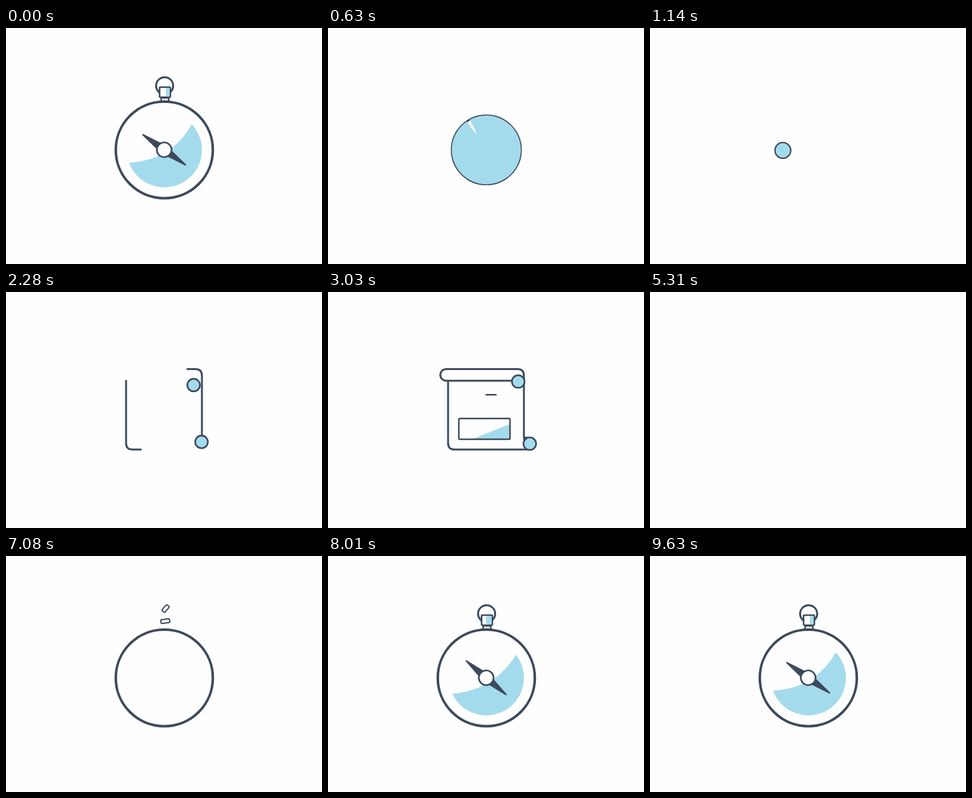
An HTML page for the animation above (9690 ms loop, 500 by 375 pixels).

```html
<!DOCTYPE html>
<html lang="en">
<head>
<meta charset="utf-8">
<title>Compass and scroll</title>
<style>
  html, body { margin: 0; width: 100%; height: 100%; overflow: hidden; background: #fefefe; }
  svg { display: block; width: 100%; height: 100%; }
  .ink { stroke: #3c4a5b; fill: none; stroke-width: 3; stroke-linecap: round; stroke-linejoin: round; }
  .blue { fill: #a4dbec; }
  .white { fill: #fefefe; }
</style>
</head>
<body>
<svg viewBox="0 0 500 375">
  <g id="compass">
    <g id="knob">
      <rect id="loop" class="ink white"/>
      <rect id="stem" class="ink white" x="245.5" width="12" style="stroke-width:2.5"/>
      <rect id="cap" class="ink white"/>
      <rect id="shine" class="blue" y="95.5" height="13"/>
    </g>
    <circle id="ring" class="ink" cx="250.5" cy="193.7"/>
    <path id="arcs" class="ink" style="stroke-width:4"/>
    <path id="dial" class="blue"/>
    <g id="needle">
      <path d="M-42 -1 Q-43 0 -42 1 L-13 5.5 L0 6 L13 5.5 L42 1 Q43 0 42 -1 L13 -5.5 L0 -6 L-13 -5.5Z" fill="#3c4a5b"/>
      <circle class="ink white" r="11.7" style="stroke-width:2.6"/>
    </g>
  </g>
  <g id="scroll">
    <path id="sheet" class="ink" pathLength="1" d="M310 232 V133 Q310 122.5 300 122.5 H187 A9.2 9.2 0 0 0 187 141 H291 M190 141 V240 Q190 250.3 200 250.3 H319"/>
    <path id="fold" d="M309 230 H320 L312 238 L309 238Z" fill="#3c4a5b"/>
    <path id="wedge" class="blue" d="M228 234 L287.5 210 V234Z"/>
    <path id="frame" class="ink" pathLength="1" style="stroke-width:2.4" d="M288 203 V232 Q288 234 286 234 H209 Q207 234 207 232 V203 Q207 201 209 201 H286 Q288 201 288 203"/>
    <path id="line1" class="ink" style="stroke-width:2.5"/>
    <path id="line2" class="ink" style="stroke-width:2.5"/>
    <circle id="ballA" class="ink blue"/>
    <circle id="ballB" class="ink blue"/>
  </g>
</svg>
<script>
const LOOP = 9690, CX = 250.5, CY = 193.7;
const el = {};
document.querySelectorAll('[id]').forEach(e => el[e.id] = e);

const set = (id, attrs) => {
  for (const name in attrs) el[id].setAttribute(name, attrs[name]);
};
const show = (id, on) => { el[id].style.display = on ? '' : 'none'; };
const unit = (t, from, to) => Math.min(1, Math.max(0, (t - from) / (to - from)));
const smooth = u => u * u * (3 - 2 * u);
const out = u => 1 - (1 - u) ** 3;

// Eased value through time, value pairs.
function keys(t, ...k) {
  let i = 0;
  while (i < k.length - 4 && t > k[i + 2]) i += 2;
  return k[i + 1] + (k[i + 3] - k[i + 1]) * smooth(unit(t, k[i], k[i + 2]));
}

function polar(r, deg) {
  const a = deg * Math.PI / 180;
  return [CX + r * Math.cos(a), CY + r * Math.sin(a)];
}

function dialPath(r, half) {
  if (half < 0.1 || r < 0.1) return '';
  const mid = 58.5, c = Math.cos(half * Math.PI / 180);
  const bend = r * (c + 0.45 * (1 - c));
  return `M${polar(r, mid - half)} A${r} ${r} 0 ${+(half > 90)} 1 ${polar(r, mid + half)}`
    + ` Q${polar(bend, mid)} ${polar(r, mid - half)}Z`;
}

function box(id, x, y, w, h, rx, turn, stroke) {
  set(id, { x: x - w / 2, y: y - h / 2, width: w, height: h, rx, transform: `rotate(${turn} ${x} ${y})` });
  el[id].style.strokeWidth = stroke;
}

function trace(id, p) {
  show(id, p > 0);
  set(id, { 'stroke-dasharray': p < 1 ? `${p} 2` : 'none' });
}

function drawRing(t) {
  const leaving = t < 1000;
  const r = leaving ? keys(t, 0, 76.8, 330, 91.5, 960, 12.5) : 76.8;
  show('ring', leaving || t >= 6800);
  set('ring', { r });
  el.ring.style.strokeWidth = leaving ? keys(t, 330, 4, 960, 2) : 4;

  const closing = t >= 5340 && t < 6800;
  show('arcs', closing);
  if (!closing) return r;
  const R = keys(t, 5330, 20, 5750, 119, 6280, 129, 6800, 76.8);
  const head = keys(t, 5340, 0, 6280, 100, 6800, 179.9);
  const tail = keys(t, 5340, 0, 6280, 70, 6800, 0);
  set('arcs', {
    d: `M${polar(R, 90 - tail)} A${R} ${R} 0 0 0 ${polar(R, 90 - head)}`
      + `M${polar(R, 90 + tail)} A${R} ${R} 0 0 1 ${polar(R, 90 + head)}`
  });
  return r;
}

function drawKnob(t) {
  const leaving = t < 1000;
  const k = leaving ? keys(t, 0, 1, 260, 0) : 1;
  set('knob', { transform: `translate(251 117) scale(${k}) translate(-251 -117)` });
  show('knob', k > 0 && (leaving || t > 6950));
  const a = leaving ? LOOP : t;
  const go = (from, to) => keys(a, 7080, from, 7300, to);
  const stroke = go(2, 3);
  box('loop', go(252.5, 251), go(83.5, 91.8),
    keys(a, 6950, 0, 7080, 12, 7260, 29, 7400, 27),
    keys(a, 6950, 0, 7080, 6, 7260, 29, 7400, 27),
    go(1.5, 14), go(-48, 0), stroke);
  box('cap', go(252, 251.5), go(103.5, 102),
    keys(a, 6950, 0, 7080, 14, 7300, 17),
    keys(a, 6950, 0, 7080, 6, 7300, 16),
    1.5, go(-8, 0), go(2, 2.6));
  const stem = keys(a, 7120, 0, 7260, 6);
  set('stem', { y: 117 - stem, height: stem });
  const shine = keys(a, 7450, 0, 7900, 9, 8300, 9, 9000, 6);
  set('shine', { x: 259 - shine, width: shine });
}

function drawFace(t, r) {
  const leaving = t < 1000;
  const half = leaving ? keys(t, 60, 101.5, 700, 179.9)
    : keys(t, 7320, 0, 7900, 96.5, 8010, 96.5, 8700, 101.5);
  const R = leaving ? Math.min(r, keys(t, 60, 59.5, 600, 76)) : 59.5;
  set('dial', { d: dialPath(R, half) });
  const size = leaving ? keys(t, 80, 1, 500, 0) : keys(t, 7320, 0, 7600, 1);
  const angle = leaving ? keys(t, 30, 35.4, 500, 155)
    : keys(t, 7320, -140, 7720, 0, 8300, 80.4, 8780, -8, 9250, 90, 9460, 10, 9630, 35.4);
  show('needle', size > 0);
  set('needle', { transform: `translate(250.3 193.5) rotate(${angle}) scale(${size})` });
}

function drawBalls(t) {
  const r = keys(t, 1700, 12.4, 2100, 10);
  const x = keys(t, 965, 250.5, 1500, 91.5, 2000, 288);
  const y = 194.5;
  const late = t > 2000;
  set('ballA', {
    r, cx: late ? keys(t, 2000, 288, 2450, 301) : x,
    cy: keys(t, 1750, y, 2000, 160, 2450, 142.3)
  });
  set('ballB', {
    r, cx: late ? keys(t, 2000, 288, 2450, 319.3) : x,
    cy: keys(t, 1750, y, 2000, 232, 2450, 241)
  });
  for (const id of ['ballA', 'ballB']) el[id].style.strokeWidth = keys(t, 1700, 2, 2300, 2.6);
}

function drawLine(id, y, p) {
  show(id, p > 0);
  set(id, { d: `M250.5 ${y} H${250.5 + 37 * p}` });
}

function drawScroll(t) {
  drawBalls(t);
  trace('sheet', smooth(unit(t, 2080, 2750)));
  show('fold', t > 2400);
  trace('frame', smooth(unit(t, 2550, 2900)));
  const wedge = keys(t, 2700, 0, 2960, 1);
  set('wedge', { transform: `translate(287.5 234) scale(${wedge}) translate(-287.5 -234)` });
  drawLine('line1', 163.3, out(unit(t, 2950, 3450)));
  drawLine('line2', 178.4, out(unit(t, 3350, 4020)));
  const u = unit(t, 3030, 3900);
  const sy = 1 + 0.06 * Math.sin(u * Math.PI * 4) * (1 - u) ** 2;
  set('scroll', { transform: `translate(0 187) scale(1 ${sy}) translate(0 -187)` });
}

function draw(t) {
  const scroll = t >= 1000 && t < 5310;
  show('scroll', scroll);
  show('compass', !scroll);
  if (scroll) return drawScroll(t);
  const r = drawRing(t);
  drawKnob(t);
  drawFace(t, r);
}

const start = performance.now();
function tick(now) {
  draw(Math.max(0, now - start) % LOOP);
  requestAnimationFrame(tick);
}
draw(0);
requestAnimationFrame(tick);
</script>
</body>
</html>
```
